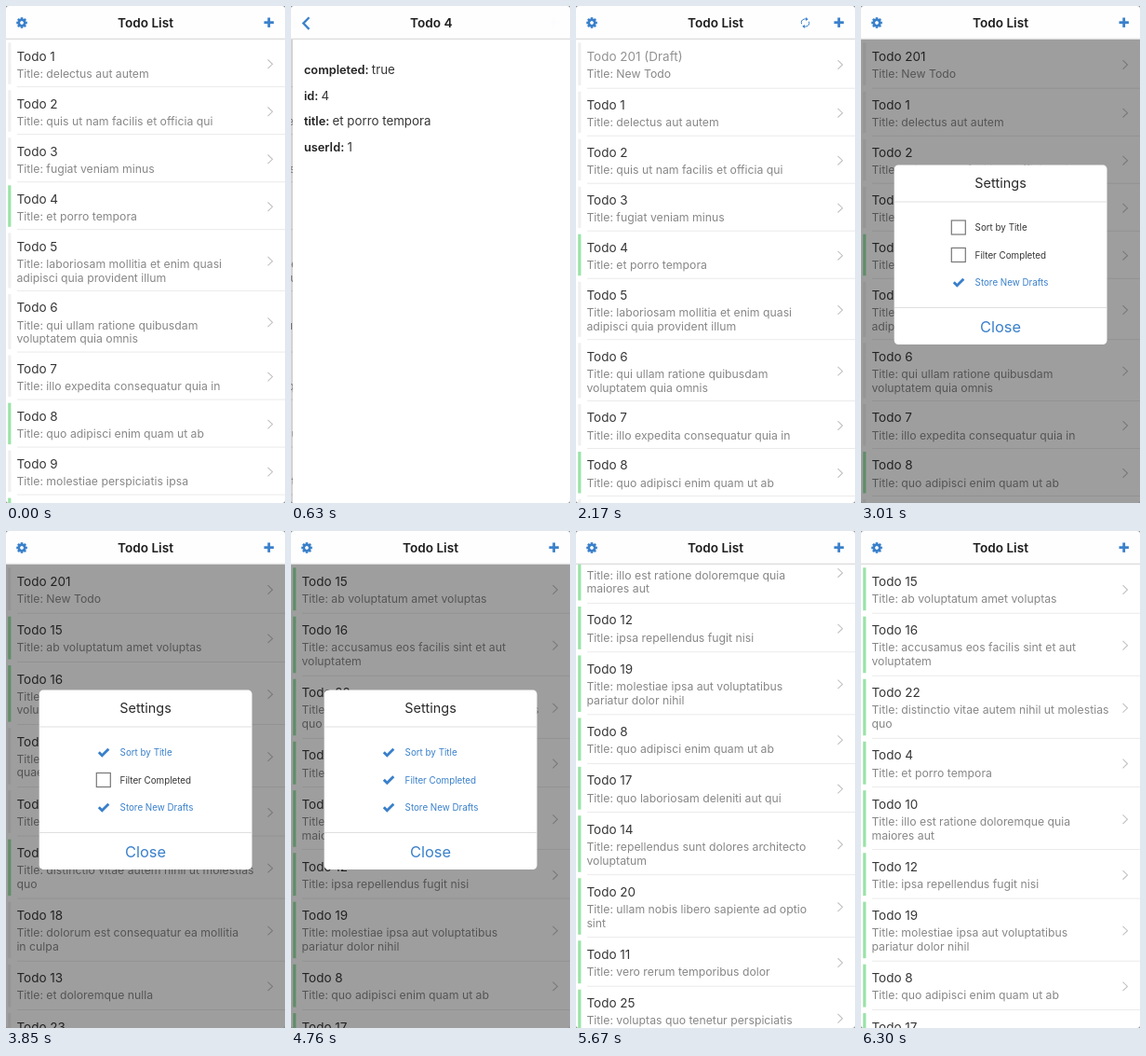
These frames come from a looping animation (300 by 533 pixels, 6370 ms). An HTML page with a canvas:

```html
<!DOCTYPE html>
<html lang="en">
<head>
<meta charset="utf-8">
<title>Todo List</title>
<style>
  html, body { margin: 0; width: 100%; height: 100%; overflow: hidden; background: #fff; }
  canvas { display: block; width: 100vw; height: 100vh; }
</style>
</head>
<body>
<canvas id="stage"></canvas>
<script>
const W = 300, H = 533, HEAD = 36, LOOP = 6370;
const BLUE = '#3a80cb', GREEN = '#9ae3a7', INK = '#363636', GREY = '#888';

const T = {
  push: 350, pop: 1223, slide: 318,
  add: 2030, synced: 2450,
  open: 2570, sort: 3640, filter: 4130, close: 4790, fade: 220,
  scroll: 5092, scrollSpan: 980
};

// A bar in a title marks its line break.
const titles = [
  'delectus aut autem',
  'quis ut nam facilis et officia qui',
  'fugiat veniam minus',
  'et porro tempora',
  'laboriosam mollitia et enim quasi|adipisci quia provident illum',
  'qui ullam ratione quibusdam|voluptatem quia omnis',
  'illo expedita consequatur quia in',
  'quo adipisci enim quam ut ab',
  'molestiae perspiciatis ipsa',
  'illo est ratione doloremque quia|maiores aut',
  'vero rerum temporibus dolor',
  'ipsa repellendus fugit nisi',
  'et doloremque nulla',
  'repellendus sunt dolores architecto|voluptatum',
  'ab voluptatum amet voluptas',
  'accusamus eos facilis sint et aut|voluptatem',
  'quo laboriosam deleniti aut qui',
  'dolorum est consequatur ea mollitia|in culpa',
  'molestiae ipsa aut voluptatibus|pariatur dolor nihil',
  'ullam nobis libero sapiente ad optio|sint',
  'suscipit repellat esse quibusdam|voluptatem quia',
  'distinctio vitae autem nihil ut molestias|quo',
  'et itaque necessitatibus maxime|molestiae qui quas velit',
  'adipisci non ad dicta qui amet|quaerat doloribus ea',
  'voluptas quo tenetur perspiciatis|explicabo natus'
];
const done = new Set([4, 8, 10, 11, 12, 14, 15, 16, 17, 19, 20, 22, 25]);

const makeTodo = (id, title) => ({ id, lines: ('Title: ' + title).split('|'), done: done.has(id) });
const base = titles.map((title, i) => makeTodo(i + 1, title));
const withNew = [makeTodo(201, 'New Todo'), ...base];
const sorted = [...withNew].sort((a, b) => a.lines[0] < b.lines[0] ? -1 : 1);
const filtered = sorted.filter(todo => todo.done);

const canvas = document.getElementById('stage');
const ctx = canvas.getContext('2d');

const clamp = x => Math.max(0, Math.min(1, x));
const ramp = (t, start, span) => clamp((t - start) / span);
const ease = x => x < 0.5 ? 4 * x ** 3 : 1 - 4 * (1 - x) ** 3;

function text(str, x, y, size, color, weight = 400, align = 'left') {
  ctx.font = `${weight} ${size}px Inter, "Liberation Sans", sans-serif`;
  ctx.textAlign = align;
  ctx.fillStyle = color;
  ctx.fillText(str, x, y);
}

function rect(x, y, w, h, color) {
  ctx.fillStyle = color;
  ctx.fillRect(x, y, w, h);
}

function line(points, color, width) {
  ctx.beginPath();
  points.forEach(([x, y]) => ctx.lineTo(x, y));
  ctx.strokeStyle = color;
  ctx.lineWidth = width;
  ctx.stroke();
}

function faded(alpha, draw) {
  if (alpha <= 0) return;
  ctx.save();
  ctx.globalAlpha *= clamp(alpha);
  draw();
  ctx.restore();
}

function drawRow(todo, y, h, draft) {
  rect(2.2, y + 3.3, 3.2, h - 6.5, todo.done ? GREEN : '#f0f0f0');
  text(`Todo ${todo.id}${draft ? ' (Draft)' : ''}`, 11.4, y + 22.7, 13.5, draft ? '#929292' : INK);
  todo.lines.forEach((str, i) => text(str, 11.4, y + 41 + i * 14.6, 12.25, GREY));
  const mid = y + h / 2 + 0.8;
  line([[281.5, mid - 4.8], [286.5, mid], [281.5, mid + 4.8]], '#c2c2c2', 1.1);
  rect(12, y + h - 0.6, W - 12, 0.7, '#e2e2e2');
}

function drawList(t) {
  const todos = t < T.add ? base : t < T.sort ? withNew : t < T.filter ? sorted : filtered;
  const roomy = t >= T.sort;
  const phase = ramp(t, T.scroll, T.scrollSpan);
  let y = HEAD - 287 * (1 - Math.cos(2 * Math.PI * phase)) / 2;
  for (const todo of todos) {
    const wide = roomy || todo.id === 201;
    const h = (wide ? 52.4 : 51) + (todo.lines.length - 1) * 14.65;
    if (y < H && y + h > HEAD) drawRow(todo, y, h, todo.id === 201 && t < T.synced);
    y += h;
  }
}

function drawDetail(x) {
  const shade = ctx.createLinearGradient(x - 8, 0, x, 0);
  shade.addColorStop(0, 'rgba(0,0,0,0)');
  shade.addColorStop(1, 'rgba(0,0,0,.22)');
  rect(x - 8, HEAD, 8, H - HEAD, shade);
  rect(x, HEAD, W, H - HEAD, '#fff');
  const fields = { completed: 'true', id: '4', title: 'et porro tempora', userId: '1' };
  Object.entries(fields).forEach(([key, value], i) => {
    const y = 73 + i * 27.5;
    text(key + ':', x + 12, y, 12.8, '#222', 600);
    const gap = ctx.measureText(key + ': ').width;
    text(value, x + 12 + gap, y, 13.3, INK);
  });
}

function drawGear(x, y) {
  ctx.save();
  ctx.translate(x, y);
  for (let i = 0; i < 8; i++) {
    rect(-1.3, -5.8, 2.6, 3, BLUE);
    ctx.rotate(Math.PI / 4);
  }
  ctx.beginPath();
  ctx.arc(0, 0, 3.2, 0, 7);
  ctx.strokeStyle = BLUE;
  ctx.lineWidth = 2.6;
  ctx.stroke();
  ctx.restore();
}

function drawPlus(x, y) {
  rect(x - 5.2, y - 1.4, 10.4, 2.8, BLUE);
  rect(x - 1.4, y - 5.2, 2.8, 10.4, BLUE);
}

function drawSync(x, y) {
  ctx.save();
  ctx.translate(x, y);
  for (let i = 0; i < 2; i++) {
    ctx.beginPath();
    ctx.arc(0, 0, 4.1, Math.PI * 0.9, Math.PI * 1.65);
    ctx.strokeStyle = BLUE;
    ctx.lineWidth = 1;
    ctx.stroke();
    ctx.beginPath();
    ctx.moveTo(0.6, -5.9);
    ctx.lineTo(3.2, -3.8);
    ctx.lineTo(0.6, -2);
    ctx.fillStyle = BLUE;
    ctx.fill();
    ctx.rotate(Math.PI);
  }
  ctx.restore();
}

function drawHeader(t, home, shift) {
  rect(0, 0, W, HEAD - 0.5, '#fefefe');
  rect(0, HEAD - 1.2, W, 0.9, '#cfcfcf');
  faded(home * 1.1, () => {
    text('Todo List', 150 + shift, 22.7, 13.6, '#1c1c1c', 600, 'center');
    drawGear(17, 18);
    drawPlus(282.7, 17.7);
    if (t >= T.add && t < T.synced) drawSync(246.5, 18);
  });
  faded(1 - home, () => {
    text('Todo 4', 150 + 122 * home, 22.7, 13.6, '#1c1c1c', 600, 'center');
    line([[19.5, 12.3], [13.3, 18.6], [19.5, 24.9]], BLUE, 2.3);
  });
}

function drawOption(label, y, checked) {
  if (checked) {
    line([[99.8, y - 0.3], [103.3, y + 3.2], [110.3, y - 3.8]], BLUE, 2.9);
  } else {
    ctx.strokeStyle = '#777';
    ctx.lineWidth = 1.2;
    ctx.strokeRect(97.3, y - 7.5, 15, 15);
  }
  text(label, 122.6, y + 3.6, 9.8, checked ? BLUE : INK);
}

function drawSettings(t) {
  rect(0, HEAD, W, H - HEAD, 'rgba(0,0,0,.38)');
  ctx.beginPath();
  ctx.roundRect(35.7, 170.5, 228.8, 192.5, 4.5);
  ctx.fillStyle = '#fff';
  ctx.fill();
  rect(35.7, 209.6, 228.8, 0.8, '#d8d8d8');
  rect(35.7, 323, 228.8, 0.8, '#d8d8d8');
  text('Settings', 150, 195.4, 14.4, '#2a2a2a', 400, 'center');
  drawOption('Sort by Title', 237.5, t >= T.sort);
  drawOption('Filter Completed', 267, t >= T.filter);
  drawOption('Store New Drafts', 296.5, true);
  text('Close', 150, 350, 16.4, BLUE, 400, 'center');
}

function drawCorners() {
  ctx.beginPath();
  ctx.rect(0, 0, W, H);
  ctx.roundRect(0, 0, W, H, 3);
  ctx.fillStyle = '#8a8a8a';
  ctx.fill('evenodd');
}

function draw(t) {
  const home = 1 - ease(ramp(t, T.push, T.slide)) + ease(ramp(t, T.pop, T.slide));
  const shift = -156 * (1 - home);
  rect(0, 0, W, H, '#fff');
  ctx.save();
  ctx.translate(shift, 0);
  drawList(t);
  ctx.restore();
  if (home < 1) drawDetail(W * home);
  faded(ramp(t, T.open, T.fade) - ramp(t, T.close, T.fade), () => drawSettings(t));
  drawHeader(t, home, shift);
  drawCorners();
}

function resize() {
  const dpr = window.devicePixelRatio || 1;
  canvas.width = Math.round(innerWidth * dpr);
  canvas.height = Math.round(innerHeight * dpr);
}

const start = performance.now();
function tick() {
  ctx.setTransform(canvas.width / W, 0, 0, canvas.height / H, 0, 0);
  draw((performance.now() - start) % LOOP);
  requestAnimationFrame(tick);
}

addEventListener('resize', resize);
resize();
tick();
</script>
</body>
</html>
```
